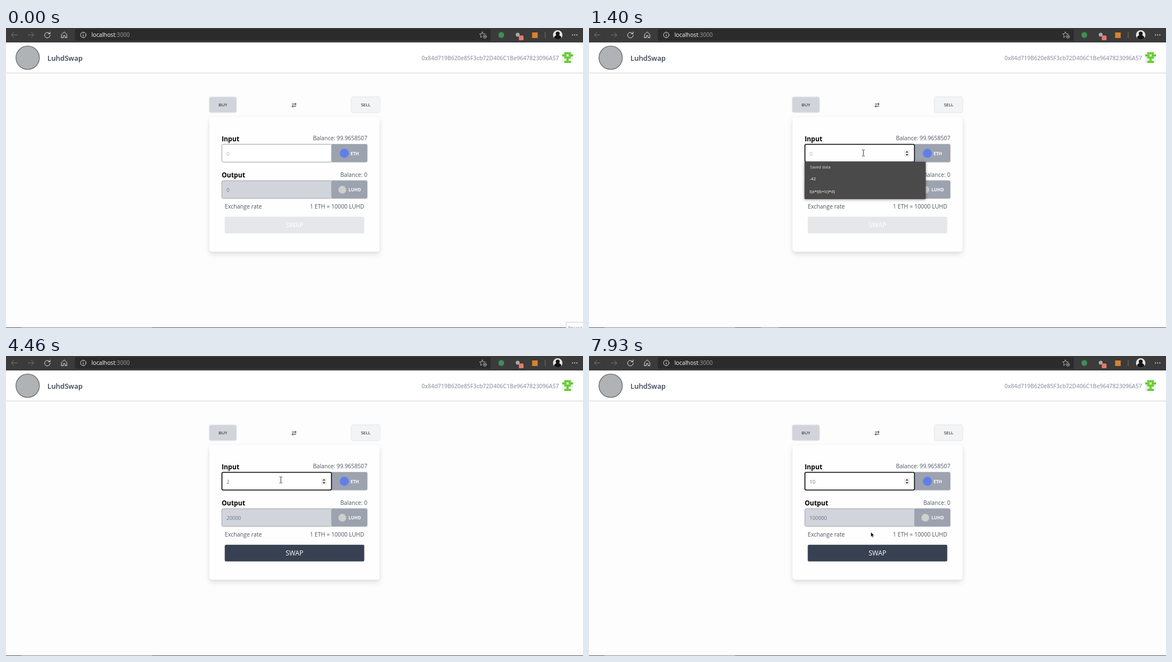
An HTML page that plays this animation: 1038 by 540 pixels, repeating every 7990 ms.

```html
<!DOCTYPE html>
<html lang="en">
<head>
<meta charset="utf-8">
<title>Token swap</title>
<style>
  html, body { margin: 0; width: 100%; height: 100%; overflow: hidden; background: #fdfdfd; }
  svg { display: block; width: 100%; height: 100%; font-family: "Open Sans", "Noto Sans", sans-serif; }
  .body { font-size: 10.2px; fill: #4b5563; }
  .head { font-size: 11.7px; font-weight: 700; fill: #000; }
  .value { font-size: 9.1px; fill: #6b7280; }
  .unit { font-size: 8.05px; font-weight: 700; fill: #f9fafb; }
  .tab { font-size: 8px; font-weight: 500; fill: #111; text-anchor: middle; }
  .menu { font-size: 7.7px; fill: #fff; }
  .end { text-anchor: end; }
  .icon { fill: none; stroke: #e4e4e4; stroke-width: 1; stroke-linecap: round; stroke-linejoin: round; }
  .low { filter: drop-shadow(0 .8px 1px rgba(0,0,0,.22)); }
  .card { filter: drop-shadow(0 5px 5px rgba(0,0,0,.1)) drop-shadow(0 1px 2px rgba(0,0,0,.05)); }
</style>
</head>
<body>
<svg viewBox="0 0 1038 540" preserveAspectRatio="none">
  <rect width="1038" height="540" fill="#fdfdfd"/>

  <!-- browser bar -->
  <rect width="1038" height="26" fill="#3b3b3b"/>
  <rect x="124" y="2" width="748" height="21" rx="3" fill="#2b2b2b"/>
  <g class="icon">
    <path d="M20 12.500H9.500M14 8l-4.500 4.500L14 17" stroke="#777"/>
    <path d="M39.500 12.500H50M45.500 8l4.500 4.500L45.500 17" stroke="#777"/>
    <path d="M78.700 10.200A5 5 0 1 0 79.500 13M79.200 7.200v3.300h-3.300"/>
    <path d="M100 11.500l4.700-4.300 4.700 4.300v6h-3.200v-3.800h-3v3.800H100z"/>
    <circle cx="139" cy="12.500" r="4.900"/>
    <path d="M139 12v3M139 10v.1"/>
    <path d="M857 7l1.500 3.300 3.600.4M857 7l-1.500 3.300-3.600.4 2.700 2.500-.8 3.700 2.500-1.400" stroke="#b5b5b5"/>
    <circle cx="861.500" cy="15.500" r="2.900" stroke="#b5b5b5"/>
    <path d="M860.300 15.500h2.400M861.500 14.300v2.400" stroke="#b5b5b5" stroke-width=".8"/>
    <path d="M970 7.500v10" stroke="#777"/>
  </g>
  <text x="153.700" y="16" font-size="10.240" fill="#fff">localhost<tspan fill="#a0a0a0">:3000</tspan></text>
  <circle cx="891" cy="12.500" r="5.200" fill="#3f8f55"/>
  <circle cx="920.500" cy="12" r="3.500" fill="#aaa"/>
  <rect x="922.500" y="13.500" width="8.500" height="8.500" rx="1.500" fill="#e27a6b"/>
  <rect x="946.500" y="8" width="10" height="10" fill="#d9822e"/>
  <circle cx="992.500" cy="12.500" r="8.500" fill="#e6e6e6"/>
  <circle cx="992.500" cy="10" r="3.600" fill="#151515"/>
  <path d="M986 18a6.500 5.500 0 0 1 13 0a8.500 8.500 0 0 1-13 0z" fill="#151515"/>
  <g fill="#eee"><circle cx="1019" cy="12.500" r=".9"/><circle cx="1023" cy="12.500" r=".9"/><circle cx="1027" cy="12.500" r=".9"/></g>

  <!-- page header -->
  <rect y="26" width="1038" height="54.500" fill="#fff"/>
  <rect y="80.300" width="1038" height="1.400" fill="#dedfe1"/>
  <circle cx="39" cy="53.500" r="21" fill="#b0b3b5" stroke="#777b7e" stroke-width="1.600"/>
  <text x="74.500" y="59.300" font-size="12.700" font-weight="600" fill="#374151">LuhdSwap</text>
  <text class="end" x="994.700" y="57.700" font-size="10.120" font-weight="600" fill="#9ca3af">0x84d719B620e85F3cb72D406C1Be9647823096A57</text>
  <rect x="1000.500" y="43.500" width="19.500" height="19.500" fill="#f0f0f0"/>
  <g id="badge" fill="#62cb2c"></g>

  <!-- tabs -->
  <rect class="low" x="366" y="124.500" width="48.300" height="27.300" rx="2.700" fill="#d1d5db"/>
  <text class="tab" x="390.300" y="141.200">BUY</text>
  <rect class="low" x="621.700" y="124.500" width="50.300" height="27.300" rx="2.700" fill="#f3f4f6"/>
  <text class="tab" x="647" y="141.200">SELL</text>
  <path d="M514.500 136.900h7.500M520 134.900l2 2-2 2M522 140.900h-7.500M516.500 138.900l-2 2 2 2" fill="none" stroke="#222" stroke-width="1"/>

  <!-- card -->
  <rect class="card" x="366" y="160" width="306" height="242.700" rx="5" fill="#fefefe"/>
  <text class="head" x="388" y="203.800">Input</text>
  <text class="body end" x="650" y="202.300">Balance: 99.9658507</text>
  <g class="low">
    <path d="M586 209h61.300a2.700 2.700 0 0 1 2.700 2.700v27.100a2.700 2.700 0 0 1-2.700 2.700H586z" fill="#9ca3af"/>
    <rect id="field" x="388.500" y="209.500" width="197" height="31.700" rx="2.200" fill="#fff"/>
  </g>
  <circle cx="608.700" cy="225.500" r="8.200" fill="#627eea"/>
  <text class="unit" x="619.700" y="228.500">ETH</text>
  <text id="amount" class="value" x="396.800" y="229.600"></text>
  <g id="spin">
    <rect x="567" y="219.500" width="10" height="12.500" fill="#efefef"/>
    <path d="M569.300 224.200l2.700-3 2.700 3zM569.300 227l2.700 3 2.700-3z" fill="#444"/>
  </g>
  <rect id="caret" y="219" width="1" height="13" fill="#111"/>

  <text class="head" x="388" y="269.300">Output</text>
  <text class="body end" x="650" y="267.800">Balance: 0</text>
  <g class="low">
    <path d="M586 274.500h61.300a2.700 2.700 0 0 1 2.700 2.700v27.100a2.700 2.700 0 0 1-2.700 2.700H586z" fill="#9ca3af"/>
    <rect x="388.500" y="275" width="197" height="31.500" rx="2.200" fill="#d1d5db" stroke="#a3a9b4" stroke-width=".9"/>
  </g>
  <circle cx="605" cy="291" r="7" fill="#cfcfcc"/>
  <text class="unit" x="616" y="294.100">LUHD</text>
  <text id="result" class="value" x="396.800" y="295"></text>

  <text class="body" x="393.500" y="325.200">Exchange rate</text>
  <text class="body end" x="644.500" y="325.200" font-size="10.400">1 ETH = 10000 LUHD</text>
  <rect id="swap" x="393.500" y="339.800" width="251" height="30" rx="2.500"/>
  <text x="519" y="359.300" font-size="12" fill="#fff" text-anchor="middle">SWAP</text>

  <!-- saved entries -->
  <g id="menu">
    <rect x="387.700" y="240.700" width="218" height="67.300" rx="1" fill="#4a4a4a" style="filter:drop-shadow(0 1px 2.500px rgba(0,0,0,.4))"/>
    <text class="menu" x="397.700" y="253.200" style="font-size:7.200px;fill:#dcdcdc">Saved data</text>
    <text class="menu" x="396.800" y="274.200">-42</text>
    <text class="menu" x="396.800" y="297.200">!(a*!(b+!c)*d)</text>
  </g>

  <!-- bottom edge -->
  <rect y="539" width="1038" height="1" fill="#575a58"/>
  <rect x="28" y="539" width="235" height="1" fill="#8a8e8b"/>
  <rect id="gap" x="309" y="539" width="32" height="1" fill="#8a8e8b"/>
  <g id="tip">
    <rect x="1007.500" y="529.500" width="40" height="20" fill="#fff" stroke="#cfcfcf"/>
    <text x="1011" y="541.500" font-size="7.800" fill="#888">Record</text>
  </g>

  <circle id="glow" r="8.500" fill="#f7f33c" fill-opacity=".82"/>
  <path id="beam" d="M-2.500-5.500h1.700L0-4.800.8-5.500h1.700M0-4.800v9.600M-2.500 5.500h1.700L0 4.800.8 5.500h1.700" fill="none" stroke="#222" stroke-width=".9"/>
  <path id="arrow" d="M0 0v8.600l2-1.800 1.400 3 1.500-.7-1.400-2.900 2.700-.2z" fill="#111" stroke="#fff" stroke-width=".5"/>
</svg>
<script>
const LOOP = 7990, STEP = 1000 / 15, RATE = 10000;
const $ = id => document.getElementById(id);
const show = (id, on) => $(id).setAttribute("visibility", on ? "visible" : "hidden");
const set = (id, attrs) => { for (const k in attrs) $(id).setAttribute(k, attrs[k]); };
const within = (t, a, b) => t >= a && t < b;

// time, x, y of the pointer
const path = [
  [66, 1018, 510], [200, 895, 412], [334, 755, 315], [467, 640, 255], [600, 560, 222],
  [734, 511, 213], [800, 506.5, 215], [867, 505, 219.5], [1067, 500, 222], [1267, 493.5, 225],
  [3000, 493.5, 225], [3134, 493.3, 223.5], [3466, 493.3, 223.5], [3600, 494.5, 223],
  [7734, 494.5, 223], [7800, 498, 248], [7867, 504, 297], [7933, 507, 317]
];
const typed = [[0, ""], [1860, "2"], [4870, "20"], [6400, "2"], [6600, ""], [6930, "1"], [7130, "10"]];
// each pair is a moment the caret appears and the moment it goes
const blinks = [[870, 1400], [1860, 2330], [2860, 3400], [3930, 4460], [4870, 5400],
  [5930, 6460], [6930, 7660]];

function pointer(t) {
  let i = 0;
  while (i < path.length - 2 && t >= path[i + 1][0]) i++;
  const [a, x, y] = path[i], [b, u, v] = path[i + 1];
  const k = Math.min(1, Math.max(0, (t - a) / (b - a)));
  return [x + (u - x) * k, y + (v - y) * k];
}

function draw(t) {
  const text = typed.filter(([at]) => t >= at).pop()[1];
  const focus = t >= 870;
  $("amount").textContent = text || "0";
  $("amount").style.fill = text ? "#6b7280" : "#a9afb9";
  $("result").textContent = text * RATE;
  set("swap", { fill: text ? "#374151" : "#e5e7eb" });
  set("field", { stroke: focus ? "#0b0b0b" : "#a3a9b4", "stroke-width": focus ? 1.6 : 0.9 });
  set("caret", { x: text ? 396.3 + text.length * 5.2 : 397 });
  show("caret", blinks.some(([a, b]) => within(t, a, b)));
  show("menu", within(t, 1130, 1860));
  show("gap", within(t, 1130, 1860));
  show("tip", t < 200);

  const [x, y] = pointer(Math.floor((t + 4) / STEP) * STEP);
  const over = x > 388 && x < 586 && y > 209 && y < 242;
  const move = { transform: `translate(${x} ${y})` };
  ["beam", "arrow", "glow"].forEach(id => set(id, move));
  show("spin", focus || over);
  show("beam", over && t >= 66);
  show("arrow", !over && t >= 66);
  show("glow", within(t, 870, 1000));
}

const cell = 3.9;
[".###.", "##.##", ".###.", "..#..", ".###."].forEach((row, j) =>
  [...row].forEach((c, i) => {
    if (c === ".") return;
    const r = document.createElementNS("http://www.w3.org/2000/svg", "rect");
    const box = { x: 1000.5 + i * cell, y: 43.5 + j * cell, width: cell, height: cell };
    for (const k in box) r.setAttribute(k, box[k]);
    $("badge").append(r);
  }));

const start = performance.now();
function tick() {
  draw((performance.now() - start) % LOOP);
  requestAnimationFrame(tick);
}
tick();
</script>
</body>
</html>
```
